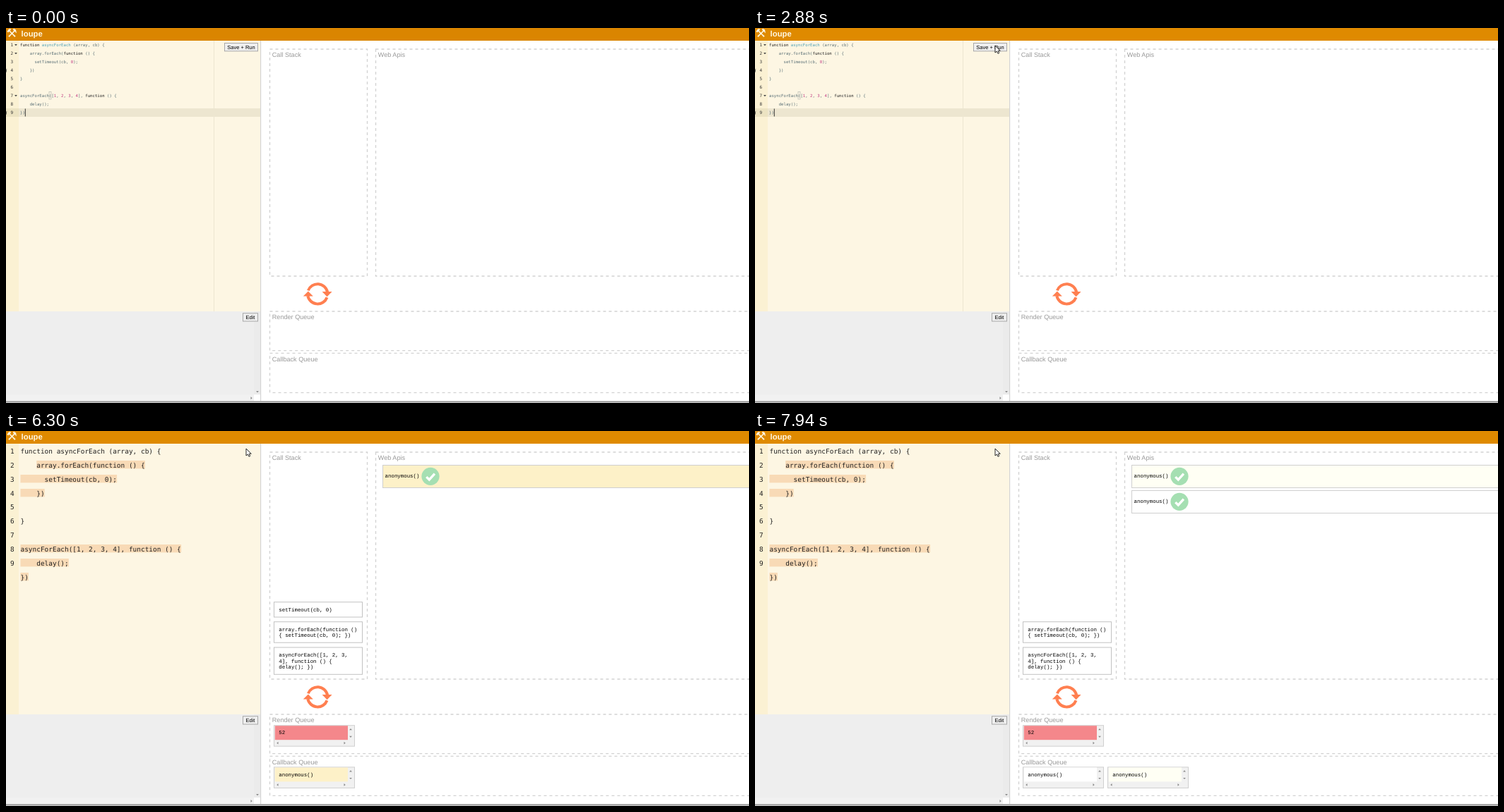
Write an HTML page that moves like this. It is 1052 px wide and 532 px high and loops after 8 s.

```html
<!DOCTYPE html>
<html lang="en">
<head>
<meta charset="utf-8">
<title>Event loop</title>
<style>
  html, body { margin: 0; width: 100%; height: 100%; overflow: hidden; background: #fff; }
  svg { display: block; }
  text { white-space: pre; text-rendering: geometricPrecision; }
  .sans { font-family: "Liberation Sans", Arial, sans-serif; }
  .mono { font: 7.4px "Liberation Mono", monospace; }
  .code { font-family: "DejaVu Sans Mono", monospace; }
  .label { font-size: 9.1px; fill: #999; }
</style>
</head>
<body>
<svg id="stage" width="1052" height="532" viewBox="0 0 1052 532"></svg>
<script>
const LOOP = 8000;
const stage = document.getElementById('stage');
const YELLOW = [253, 241, 200], CREAM = [255, 255, 244], WHITE = [255, 255, 255];
const RED = [244, 135, 139], GREEN = [166, 225, 179];

const CODE = [
  'function asyncForEach (array, cb) {',
  '    array.forEach(function () {',
  '      setTimeout(cb, 0);',
  '    })',
  '}',
  '',
  'asyncForEach([1, 2, 3, 4], function () {',
  '    delay();',
  '})'
];
const RUN_CODE = [...CODE.slice(0, 4), '', ...CODE.slice(4)];
const CHAR = 5.69, ROW = 19.9;

const RENDERS = [[600, 940], [1600, 1910], [2630, 2880], [3590, 3860]];
const TIMEOUTS = [[5510, 6300], [6980, 7720]];

const clamp = v => Math.max(0, Math.min(1, v));
const mix = (a, b, k) => `rgb(${a.map((v, i) => Math.round(v + (b[i] - v) * clamp(k)))})`;
const between = (t, a, b) => t >= a && t < b;
const progress = (t, start, length) => clamp(Math.floor((t - start) / 65) * 65 / length);

const rect = (x, y, w, h, fill, more = '') =>
  `<rect x="${x}" y="${y}" width="${w}" height="${h}" fill="${fill}" ${more}/>`;
const text = (x, y, s, cls, more = '') => `<text x="${x}" y="${y}" class="${cls}" ${more}>${s}</text>`;
const path = (d, more) => `<path d="${d}" ${more}/>`;
const group = (opacity, body) => `<g opacity="${opacity.toFixed(2)}">${body}</g>`;
const arrow = (x, y, turn, fill = '#888') =>
  path('M-1.9 -1H1.9L0 1.2Z', `fill="${fill}" transform="translate(${x} ${y}) rotate(${turn})"`);

function button(x, y, w, h, label, down) {
  return rect(x, y, w, h, down ? '#d4d4d4' : '#efefef', 'stroke="#a8a8a8"') +
    text(x + w / 2, y + 8.4, label, 'sans', 'font-size="7.5" text-anchor="middle"');
}

function panel(x, y, w, h, label) {
  return rect(x, y, w, h, 'none', 'stroke="#d2d2d2" stroke-width="1.3" stroke-dasharray="4 4"') +
    text(x + 3.3, y + 11.3, label, 'sans label');
}

function stackItem(y, h, lines) {
  return rect(379.5, y, 125, h, '#fff', 'stroke="#c2c2c2"') +
    lines.map((s, i) => text(386.3, y + 13 + i * 8.6, s, 'mono')).join('');
}

function queueItem(x, y, label, fill) {
  return rect(x, y, 114, 29.5, '#f1f1f1', 'stroke="#d0d0d0"') +
    rect(x + 1.3, y + .5, 103.2, 20, fill) +
    text(x + 6.8, y + 12.7, label, 'mono') +
    arrow(x + 108.5, y + 5.5, 180) + arrow(x + 108.5, y + 16, 0) +
    arrow(x + 5, y + 25, 90) + arrow(x + 100, y + 25, -90);
}

function apiItem(y, fill) {
  return rect(533.5, y, 540, 32, fill, 'stroke="#cfcfcf"') +
    text(536.6, y + 17.2, 'anonymous()', 'mono') +
    `<circle cx="601" cy="${y + 15.8}" r="12.6" fill="#a5dfb2"/>` +
    path(`M595.3 ${y + 16.6}l4 4 7.6 -8.4`, 'fill="none" stroke="#fff" stroke-width="3.4"');
}

function loopIcon() {
  const half = path('M427.9 372.4A14.2 14.2 0 0 1 455.1 374.5', 'fill="none" stroke="#ff7f50" stroke-width="4"') +
    path('M447.6 374H461.6L454.6 381.2Z', 'fill="#ff7f50"');
  return half + `<g transform="rotate(180 441.2 377.3)">${half}</g>`;
}

const tint = s => s.replace(/(function)|(\d)|( asyncForEach)/g, (m, key, num) =>
  `<tspan fill="${key ? '#1c1c1c' : num ? '#c03a80' : '#4a9fb5'}">${m}</tspan>`);

function editor() {
  let out = rect(0, 114, 360, 12, '#ede6d0') + rect(0, 114, 18, 12, '#ece3c2') +
    rect(294, 18, 1, 384, '#ece5d0') +
    rect(61, 90.5, 3, 10.5, 'none', 'stroke="#b9bdb4" stroke-width=".7"') +
    rect(26.8, 114.5, 1, 11, '#333');
  CODE.forEach((s, i) => {
    const y = 26.2 + i * 12;
    out += text(10.2, y, i + 1, 'code', 'font-size="6" text-anchor="end" fill="#333"') +
      text(20, y, tint(s), 'code', 'font-size="5.68" fill="#586e75"');
  });
  for (const row of [0, 1, 6]) out += arrow(14, 24 + row * 12, 0, '#444');
  for (const row of [3, 8])
    out += text(-.8, 26.5 + row * 12, 'i', 'sans', 'font-size="7" font-weight="bold" font-style="italic" fill="#333"');
  return out;
}

function highlight(row, from, to) {
  const y = Math.round(42 + (row - 1) * ROW);
  return rect(20.5 + from * CHAR, y, (to - from) * CHAR, 11.4, 'rgba(230,130,49,.25)');
}

function runningCode(t) {
  let out = highlight(7, 0, 40) + highlight(8, 0, 12) + highlight(9, 0, 2);
  if (t >= 4520) out += highlight(1, 4, 31) + highlight(2, 0, 24) + highlight(3, 0, 6);
  if (TIMEOUTS.some(([enter, leave]) => between(t, enter, leave))) out += highlight(2, 6, 23);
  RUN_CODE.forEach((s, i) => {
    const y = 31.8 + i * ROW;
    if (i < 9) out += text(11.6, y, i + 1, 'code', 'font-size="9.45" text-anchor="end" fill="#222"');
    out += text(20.5, y, s, 'code', 'font-size="9.45" fill="#222"');
  });
  return out;
}

function callStack(t) {
  let out = '';
  if (t >= 4050)
    out += group(progress(t, 4000, 200), stackItem(307, 38.3, ['asyncForEach([1, 2, 3,', '4], function () {', 'delay(); })']));
  if (t >= 4520)
    out += group(progress(t, 4470, 200), stackItem(270.7, 29.5, ['array.forEach(function ()', '{ setTimeout(cb, 0); })']));
  for (const [enter, leave] of TIMEOUTS)
    if (between(t, enter, leave + 200))
      out += group(Math.min(progress(t, enter - 50, 200), 1 - progress(t, leave, 200)),
        stackItem(242.7, 21.3, ['setTimeout(cb, 0)']));
  return out;
}

function queues(t) {
  let out = '';
  RENDERS.forEach(([start, end], i) => {
    if (between(t, start, end))
      out += group(1 - progress(t, start + 65, end - start),
        queueItem(379.5, 417.7, 48 + i, mix(YELLOW, GREEN, (t - start) / 90)));
  });
  if (t >= 4610) out += queueItem(379.5, 417.7, 52, mix(YELLOW, RED, progress(t, 4610, 260)));
  if (t >= 6300) {
    const first = mix(YELLOW, WHITE, progress(t, 6300, 195));
    const second = mix(YELLOW, CREAM, progress(t, 7720, 195));
    out += queueItem(379.5, 476.9, 'anonymous()', first) +
      apiItem(48.5, t < 7720 ? first : second);
    if (t >= 7720) out += apiItem(84.5, '#fff');
    if (t >= 7785) out += queueItem(499.5, 476.9, 'anonymous()', second);
  }
  return out;
}

function pointer(t) {
  if (t < 530) return '';
  const away = Math.pow(1 - progress(t, 530, 260), 2);
  return path('M0 0V10L2.4 8L4 11.3L5.7 10.5L4.2 7.3H7.2Z',
    `fill="#fff" stroke="#111" stroke-width=".9" transform="translate(${340 + 32 * away} ${25 + 45 * away})"`);
}

const frame = rect(0, 18, 361, 384, '#fdf6e3') + rect(0, 18, 18, 384, '#fbf1d3') +
  rect(0, 402, 361, 118, '#eee') + rect(351, 402, 9, 118, '#ebebeb') +
  rect(0, 520, 351, 9, '#f1f1f1') + arrow(356, 516, 0) + arrow(347.5, 525, -90) +
  rect(360, 18, 1.2, 511, '#d4d4d4') +
  rect(0, 529, 1052, 3, '#c8c8c8') + rect(0, 529.6, 1052, 1.4, '#999') +
  panel(373.5, 30, 138, 322, 'Call Stack') + panel(523.5, 30, 560, 322, 'Web Apis') +
  panel(373.5, 402, 700, 55.7, 'Render Queue') + panel(373.5, 461.3, 700, 56, 'Callback Queue') +
  loopIcon() + button(335.5, 404.7, 21, 11.3, 'Edit');

function draw(t) {
  const idle = t < 4050;
  return rect(0, 0, 1052, 18, t < 310 ? '#da8500' : '#df8a00') +
    text(.5, 13.2, '⚒', '', 'font-family="DejaVu Sans, sans-serif" font-size="17" fill="#fef6e1"') +
    text(21.6, 12, 'loupe', 'sans', 'font-size="11.3" font-weight="bold" fill="#fef6e1"') +
    frame +
    (idle ? editor() + button(309.5, 21.5, 47, 11.3, 'Save + Run', between(t, 3600, 3760)) : runningCode(t)) +
    callStack(t) + queues(t) + pointer(t);
}

let shown = '';
function tick() {
  const markup = draw(performance.now() % LOOP);
  if (markup !== shown) stage.innerHTML = shown = markup;
  requestAnimationFrame(tick);
}
tick();
</script>
</body>
</html>
```
